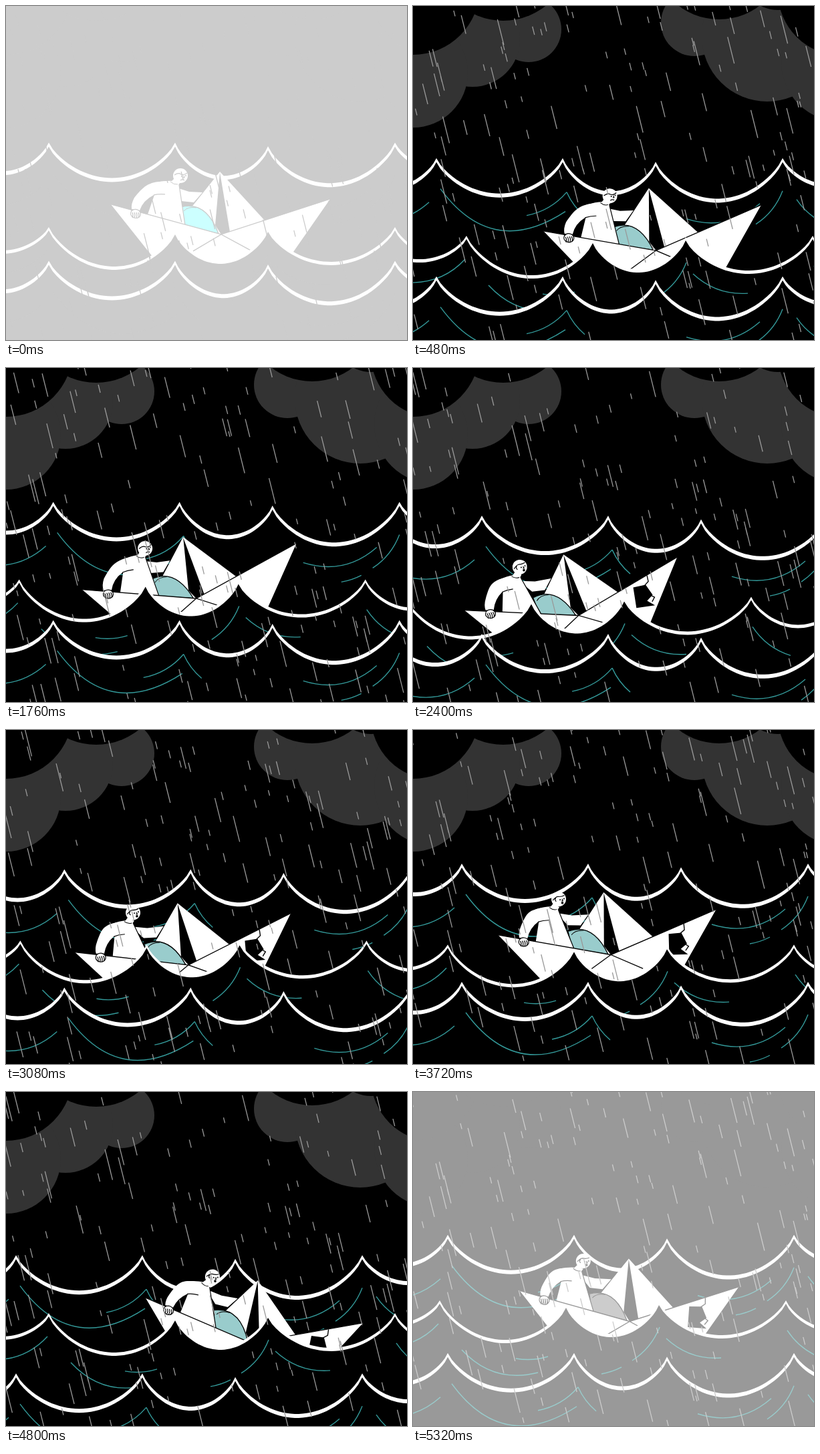
These frames come from a looping animation (600x500 px, 5360 ms). An HTML page with a canvas:

```html
<!DOCTYPE html>
<html lang="en">
<head>
<meta charset="utf-8">
<title>Paper boat in a storm</title>
<style>
html, body { margin: 0; width: 100%; height: 100%; overflow: hidden; background: #000; }
canvas { display: block; }
</style>
</head>
<body>
<canvas id="stage" width="600" height="500"></canvas>
<script>
const ctx = document.getElementById('stage').getContext('2d');
const LOOP = 5360, STEP = 40, TEAR = 1840, STRIKE = 1240;

// Turning points: time, outer wave x, inner wave x, boat x, boat angle
const SWINGS = [
  [0, 64, 64, 321, -1.4],
  [480, 35, 80, 358, -6.8],
  [1240, 47, 43, 302.5, -10.9],
  [2400, 103, -12, 236, -14],
  [3720, 73, 52, 290.5, -6.7],
  [4800, 15, 64, 371.5, 6.6],
  [5320, 52, 40, 323.5, -1]
];

// Hollow widths are shared; ripples are arcs given by their two ends
const WIDTHS = [140, 189, 139, 190, 140];
const OUTER = {
  dips: [0, 5.5], sags: [43, 53, 47, 58, 39], thick: 6,
  ripples: [
    [-110, 92, -11, 66], [6, 46, 193, 80], [135, 86, 195, 51], [195, 51, 222, 87],
    [374, 91, 484, 68], [431, 120, 461, 110], [478, 99, 518, 49], [539, 62, 567, 90]
  ]
};
const INNER = {
  dips: [6, 2], sags: [35, 56, 46, 51, 42], thick: 5,
  ripples: [
    [-80, 70, -2, 35], [33, 74, 147, 108], [114, 87, 162, 84], [242, 110, 272, 100],
    [288, 90, 329, 40], [339, 57, 421, 86], [520, 45, 577, 88]
  ]
};

// x, y, radius: grey puffs first, then the dark ones over them
const PUFFS = [[173, 35, 49], [89, 50, 71], [0, 100, 82],
               [421, 25, 50], [530, 45, 98], [640, 84, 89]];
const SHADES = [[0, -27, 100], [135, -80, 102], [458, -80, 100],
                [546, -50, 56], [641, -21, 95]];

let seed = 11;
const random = () => (seed = seed * 16807 % 2147483647) / 2147483647;
const drops = Array.from({ length: 340 }, () => ({
  x: random() * 760 - 150,
  y: random() * 800,
  len: random() < 0.5 ? 8 + random() * 6 : 20 + random() * 22
}));

function swing(t) {
  const i = Math.max(1, SWINGS.findIndex(k => k[0] >= t));
  const a = SWINGS[i - 1], b = SWINGS[i];
  const u = (t - a[0]) / (b[0] - a[0]), ease = u * u * (3 - 2 * u);
  return a.slice(1).map((v, n) => v + (b[n + 1] - v) * ease);
}

// Everything afloat sinks as it swings away from its middle
const bob = (x, mid, top, slope, round) =>
  top + slope * (Math.hypot(x - mid, round) - round);

// Lightning lifts every colour towards white in coarse steps
function palette(t) {
  const gap = Math.min(t, LOOP - t, Math.abs(t - STRIKE));
  const flash = Math.max(0, 0.8 - gap * 0.005);
  const lift = rgb => 'rgb(' + rgb.map(v =>
    51 * Math.floor((v + (255 - v) * flash + 12) / 51)) + ')';
  return {
    dark: lift([0, 0, 0]), cloud: lift([51, 51, 51]), teal: lift([51, 153, 153]),
    leg: lift([153, 204, 204]), rain: lift([153, 153, 153]), white: '#fff'
  };
}

function fill(color, draw) {
  ctx.fillStyle = color;
  ctx.beginPath();
  draw();
  ctx.fill();
}
function stroke(color, width, draw) {
  ctx.strokeStyle = color;
  ctx.lineWidth = width;
  ctx.beginPath();
  draw();
  ctx.stroke();
}
function poly(...pts) {
  for (let i = 0; i < pts.length; i += 2) ctx[i ? 'lineTo' : 'moveTo'](pts[i], pts[i + 1]);
}
function quad(x0, y0, cx, cy, x1, y1) {
  ctx.moveTo(x0, y0);
  ctx.quadraticCurveTo(cx, cy, x1, y1);
}
const disc = (color, x, y, r) => fill(color, () => ctx.arc(x, y, r, 0, 7));

// Longer ripples hang deeper
function ripple([x0, y0, x1, y1]) {
  const dx = x1 - x0, dy = y1 - y0, bend = Math.hypot(dx, dy) / 400;
  quad(x0, y0, (x0 + x1) / 2 - dy * bend, (y0 + y1) / 2 + dx * bend, x1, y1);
}

function wave({ dips, sags, thick, ripples }, x, y, c) {
  const crests = [0, 0, ...dips, 0, 0];
  const body = () => {
    let left = -WIDTHS[0];
    WIDTHS.forEach((w, i) => {
      for (let u = 0; u <= 1; u += 1 / 32) {
        const line = crests[i] + (crests[i + 1] - crests[i]) * u;
        ctx.lineTo(left + w * u, line + sags[i] * (4 * u * (1 - u)) ** 0.8);
      }
      left += w;
    });
    ctx.lineTo(left, 500);
    ctx.lineTo(-WIDTHS[0], 500);
  };
  ctx.save();
  ctx.translate(x, y);
  fill(c.white, body);
  ctx.translate(0, thick);
  fill(c.dark, body);
  ctx.translate(0, -thick);
  stroke(c.teal, 1.4, () => ripples.forEach(ripple));
  ctx.restore();
}

function head(x, y, scared, c) {
  disc(c.white, x, y, 11);
  stroke(c.dark, 1.2, () => {
    if (scared) {
      quad(x - 9, y + 1, x - 4, y - 4, x - 1, y - 4);
      quad(x - 1, y - 4, x + 5, y - 3, x + 9, y - 5);
      quad(x - 4, y + 3, x - 7, y, x - 4, y - 2);
    } else {
      quad(x - 9, y - 1, x - 3, y - 5, x + 1, y - 2);
      quad(x + 1, y - 2, x + 6, y, x + 10, y - 4);
      quad(x, y + 7, x + 3, y + 5, x + 6, y + 7);
    }
    poly(x + 5, y, x + 6, y + 3, x + 4, y + 3);
  });
  disc(c.dark, x + 2, y + 1, 1);
  disc(c.dark, x + 8, y, 1);
  if (scared) disc(c.dark, x + 5, y + 6, 1.8);
}

function man(scared, c) {
  const s = scared ? -9 : 0, pit = 221 + s / 3;
  // far arm reaching for the sail
  fill(c.white, () => poly(255 + s, 272, 274 + s / 2, 278, 294, 279, 281, 294, 262, 292));
  // torso
  fill(c.white, () => {
    poly(pit + 2, 280, 225 + s, 264);
    ctx.quadraticCurveTo(240 + s, 261, 249 + s, 262);
    ctx.lineTo(259 + s, 268);
    ctx.lineTo(268, 328);
    ctx.lineTo(212, 312);
  });
  stroke(c.dark, 1.2, () => poly(259 + s, 268, 268, 328));
  // near arm
  fill(c.white, () => {
    ctx.moveTo(240 + s, 263);
    ctx.bezierCurveTo(214 + s, 262, 206 + s / 2, 270, 192, 287);
    ctx.quadraticCurveTo(187, 296, 188, 304);
    ctx.lineTo(200, 306);
    ctx.quadraticCurveTo(205, 291, pit, 283);
    ctx.lineTo(240 + s, 281);
  });
  stroke(c.dark, 1.2, () => quad(pit, 283, pit + 8, 281, pit + 17, 282));
  // neck and collar
  fill(c.white, () => poly(246 + s, 264, 252 + s, 258, 261 + s, 264, 256 + s, 270));
  stroke(c.dark, 1, () => quad(246 + s, 263, 251 + s, 268, 257 + s, 267));
  head(261 + s, 254 + s / 4.5, scared, c);
}

function hand(c) {
  const palm = () => ctx.ellipse(194, 311, 7.5, 6.5, 0.25, 0, 7);
  fill(c.white, palm);
  stroke(c.dark, 1.2, palm);
  stroke(c.dark, 1.2, () => {
    for (let x = 189; x < 200; x += 3) quad(x, 309, x + 2, 313, x, 317);
  });
}

function boat(x, y, angle, torn, c) {
  ctx.save();
  ctx.translate(x, y);
  ctx.rotate((angle + 1.4) * Math.PI / 180);
  ctx.translate(-321, -293);

  // sail with its dark fold
  fill(c.white, () => poly(320, 248, 387, 321, 322, 344, 270, 328, 277, 302));
  fill(c.dark, () => poly(320, 249, 313, 328, 322, 342, 335, 338));
  fill(c.dark, () => poly(261, 290, 279, 292, 274, 302, 261, 303));

  const thigh = () => {
    ctx.moveTo(262, 301);
    ctx.bezierCurveTo(286, 295, 305, 306, 318, 341);
    ctx.lineTo(266, 328);
  };
  fill(c.leg, thigh);
  stroke(c.dark, 1.3, thigh);
  stroke(c.dark, 1, () => quad(266, 307, 272, 300, 285, 302));
  man(torn, c);

  // hull
  fill(c.white, () => poly(157, 297, 322, 342, 485, 289, 414, 391, 370, 415, 270, 415, 235, 395));
  stroke(c.dark, 1.3, () => {
    poly(157, 297, 322, 342, 485, 289);
    poly(280, 367, 322, 342, 368, 367);
  });
  hand(c);

  if (torn) {
    fill(c.dark, () => poly(411, 319, 430, 319, 437, 336, 427, 343, 437, 352, 409, 350));
    stroke(c.dark, 1.4, () => {
      poly(428, 320, 435, 315, 435, 306);
      poly(430, 333, 439, 340, 434, 346);
    });
  }
  ctx.restore();
}

function rain(t, c) {
  stroke(c.rain, 1.3, () => drops.forEach(d => {
    const y = (d.y + t) % 800 - 60, x = d.x + y / 4;
    poly(x, y, x + d.len / 4, y + d.len);
  }));
}

function draw(t) {
  const c = palette(t);
  const [outerX, innerX, boatX, angle] = swing(t);
  const outerY = bob(outerX, 73, 200, 0.83, 5);
  ctx.fillStyle = c.dark;
  ctx.fillRect(0, 0, 600, 500);
  PUFFS.forEach(p => disc(c.cloud, ...p));
  SHADES.forEach(p => disc(c.dark, ...p));
  wave(OUTER, outerX, outerY, c);
  boat(boatX, bob(boatX, 301, 285, 0.7, 12), angle, t >= TEAR, c);
  wave(INNER, innerX, bob(innerX, 33, 309, 0.83, 5), c);
  wave(OUTER, outerX, outerY + 177, c);
  rain(t, c);
}

const start = performance.now();
function tick() {
  const t = (performance.now() - start) % LOOP;
  draw(Math.min(Math.floor(t / STEP) * STEP, LOOP - STEP));
  requestAnimationFrame(tick);
}
tick();
</script>
</body>
</html>
```
